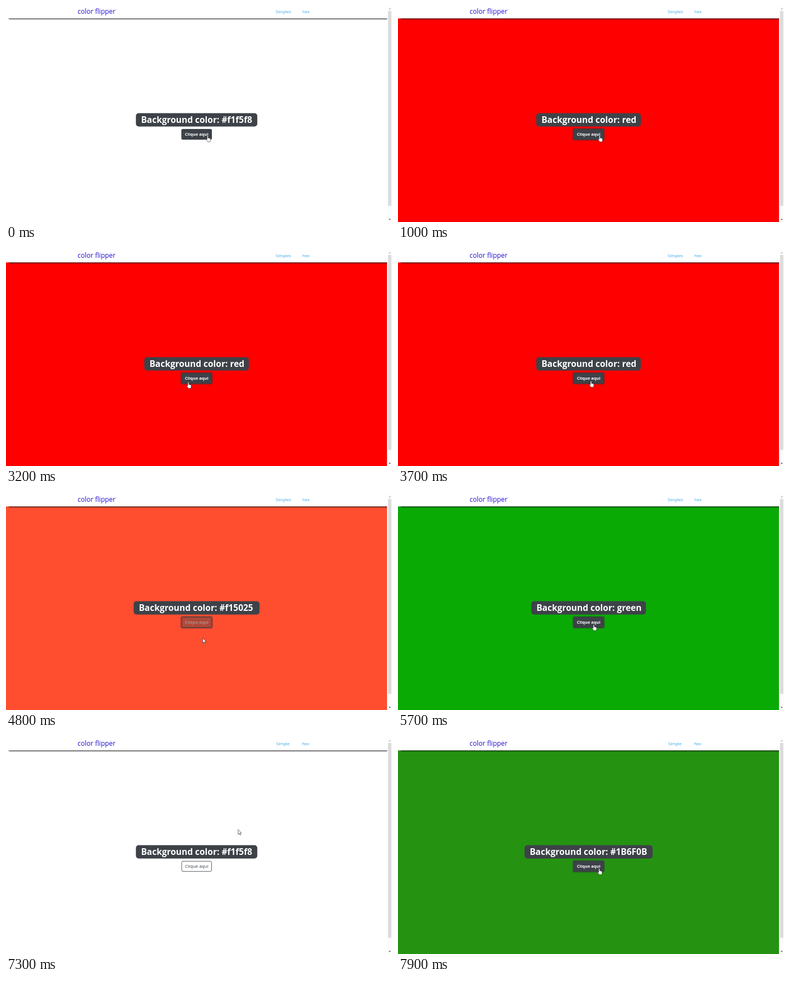
Recreate the animation shown at these times as an HTML page. Size 690 px wide and 388 px high, loop 8 s.

```html
<!DOCTYPE html>
<html lang="pt">
<head>
<meta charset="utf-8">
<title>color flipper</title>
<style>
html, body { margin: 0; height: 100%; overflow: hidden; background: #fff; }
svg { display: block; width: 690px; height: 388px; font-family: "Open Sans", "Noto Sans", sans-serif; }
.nav { font-size: 7.5px; fill: #36a6e6; letter-spacing: .05px; }
#label { font-size: 15.5px; font-weight: 700; fill: #fff; }
.caption { font-size: 8px; fill: #343a40; text-anchor: middle; }
.caption.bold { font-size: 7.5px; font-weight: 700; fill: #fff; }
</style>
</head>
<body>
<svg viewBox="0 0 690 388">
  <defs><filter id="blur" x="-5%" y="-20%" width="110%" height="140%"><feGaussianBlur stdDeviation=".8"/></filter></defs>
  <rect id="page" width="681.3" height="388"/>
  <rect x="5" width="690" height="23.3" fill="#000" filter="url(#blur)"/>
  <rect width="682" height="22.3" fill="#fff"/>
  <text x="128" y="13.5" font-size="12" fill="#2410d4">color flipper</text>
  <text id="simple" class="nav" y="13.3"></text>
  <text id="hex" class="nav" y="13.3">hex</text>

  <rect id="box" y="192.5" height="24" rx="5" fill="#3d4248"/>
  <text id="label" y="210.3"></text>

  <rect id="ring" x="312.8" y="220.2" width="56" height="20.6" rx="3" fill="none" stroke="#343a40" stroke-opacity=".5" stroke-width="1.8"/>
  <rect id="fill" x="313.7" y="221" width="54.2" height="19" rx="2.3" fill="#3d4248"/>
  <rect x="314.1" y="221.4" width="53.4" height="18.2" rx="2" fill="none" stroke="#343a40" stroke-width=".8"/>
  <text id="dark" class="caption" x="340.8" y="232.8">Clique aqui</text>
  <text id="light" class="caption bold" x="340.8" y="232.8">Clique aqui</text>

  <rect x="681.3" width="8.7" height="388" fill="#fcfcfc"/>
  <rect x="683" y="9" width="5.8" height="350" fill="#dcdcdc"/>
  <path d="M684 6l2-2 2 2z" fill="#aaa"/>
  <path d="M684 382.5h4l-2 2z" fill="#444"/>

  <g id="cursor" stroke-linejoin="round">
    <path id="hand" d="M-1 .8Q0-.3 .9 .8V4.5L4 5.2Q5.3 5.6 5.2 7L4.4 11.5H0L-2.7 7.4Q-2.8 6-1 7Z" fill="#fff" stroke="#222" stroke-width=".6"/>
    <path id="arrow" d="M0 0V8.6L2 6.8 3.4 10 4.8 9.4 3.4 6.3H6Z" fill="#fff" stroke="#111" stroke-width=".6"/>
  </g>
</svg>
<script>
const LOOP = 8000, STEP = 100;
const CENTER = 340.7, PADDING = 10;
const $ = id => document.getElementById(id);

// time, colour name, page colour, label box width
const colors = [
  [0, '#f1f5f8', '#ffffff', 217],
  [100, 'red', '#ff0000', 187],
  [1700, 'rgba(133,122,200)', '#9988e3', 305],
  [2100, 'red', '#ff0000', 187],
  [3800, '#f15025', '#ff4d30', 225],
  [5700, 'green', '#0aaa05', 205],
  [6900, '#f1f5f8', '#ffffff', 217],
  [7700, '#1B6F0B', '#259311', 229]
];

// time, x, y of the pointer tip
const pointer = [
  [0, 360.6, 232.5], [3100, 360.6, 232.5], [3200, 326, 237], [3500, 326, 237],
  [3700, 345, 235], [4700, 345, 235], [4800, 351.6, 259], [4900, 352, 271],
  [5100, 352, 271], [5400, 350, 234], [6200, 350, 234], [6600, 540.5, 12],
  [6900, 540.5, 12], [7100, 470, 95], [7500, 359.8, 234], [8000, 359.8, 234]
];

// time, whether the button is hovered
const hovers = [[-1000, 1], [4710, 0], [5350, 1], [6210, 0], [7450, 1]];

const current = (list, t) => list.findLast(entry => entry[0] <= t);

function pointerAt(t) {
  const [t0, x0, y0] = current(pointer, t);
  const [t1, x1, y1] = pointer.find(key => key[0] > t);
  const k = (t - t0) / (t1 - t0);
  return [x0 + (x1 - x0) * k, y0 + (y1 - y0) * k];
}

function hoverAt(t) {
  const [start, on] = current(hovers, t);
  const k = Math.min(1, (t - start) / 150);
  return on ? k : 1 - k;
}

function draw(t) {
  const [, name, page, width] = current(colors, t);
  const left = CENTER - width / 2;
  $('page').setAttribute('fill', page);
  $('box').setAttribute('x', left);
  $('box').setAttribute('width', width);
  $('label').setAttribute('x', left + PADDING - .8);
  $('label').textContent = 'Background color: ' + name;

  const hover = hoverAt(t);
  $('fill').style.opacity = $('light').style.opacity = hover;
  $('dark').style.opacity = 1 - hover;
  const focused = t >= 100 && t < 6600 || t >= 7700;
  $('ring').style.opacity = focused ? 1 : 0;

  const hexPage = t >= 6900;
  $('simple').textContent = hexPage ? 'Simple' : 'Simples';
  $('simple').setAttribute('x', hexPage ? 483 : 482);
  $('hex').setAttribute('x', hexPage ? 529.2 : 530);

  const [x, y] = pointerAt(t);
  const onLink = y < 20 && x > 528;
  const onButton = x > 313 && x < 369 && y > 220 && y < 241;
  $('hex').style.fill = onLink ? '#1670a8' : '';
  $('cursor').setAttribute('transform', `translate(${x} ${y})`);
  $('hand').style.display = onLink || onButton ? '' : 'none';
  $('arrow').style.display = onLink || onButton ? 'none' : '';
}

const begin = performance.now();
function tick() {
  const t = (performance.now() - begin) % LOOP;
  draw(Math.floor(t / STEP) * STEP);
  requestAnimationFrame(tick);
}
tick();
</script>
</body>
</html>
```
